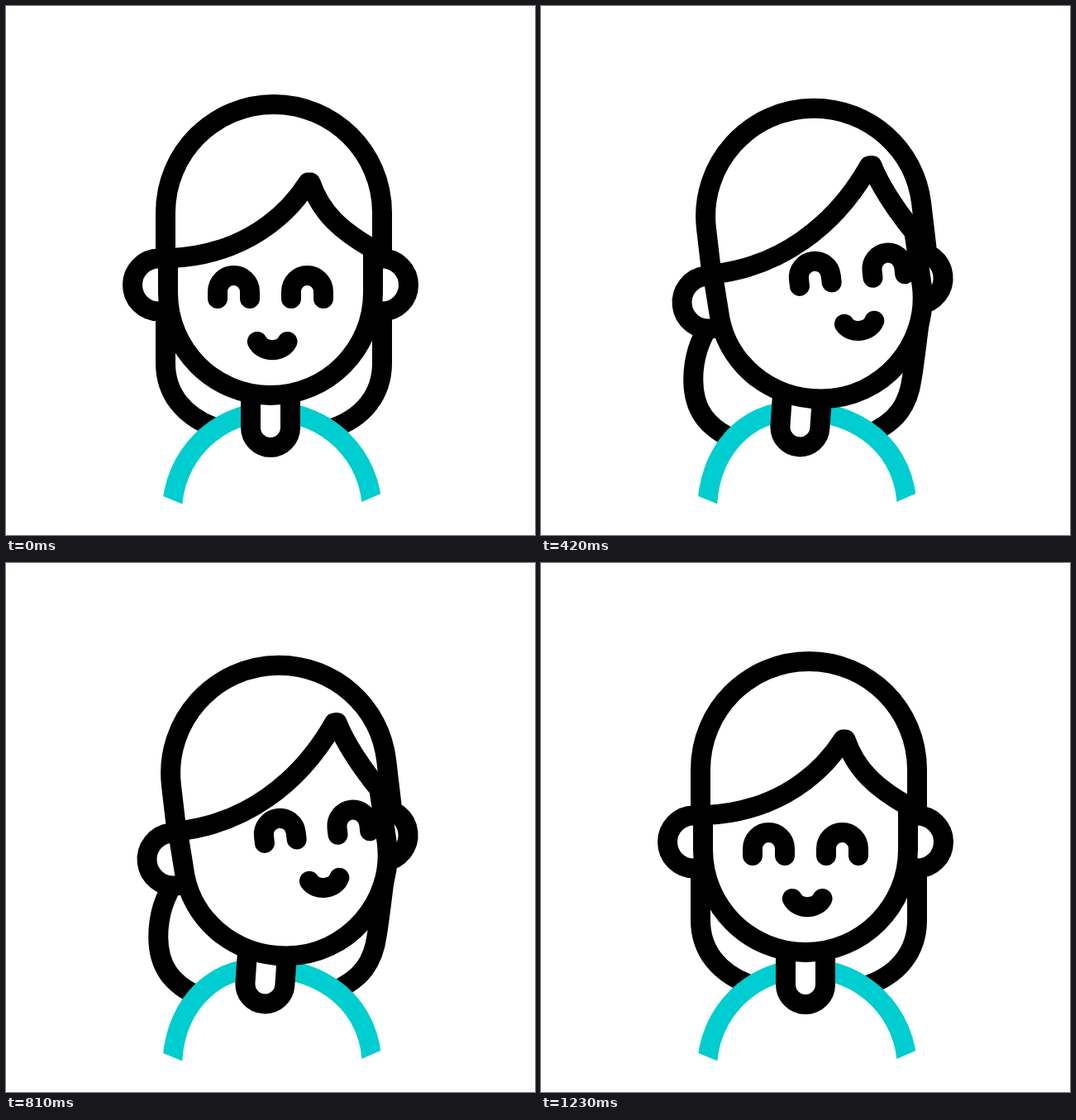
Write an HTML page that moves like this. It is 640 px wide and 640 px high and loops after 1260 ms.

```html
<!DOCTYPE html>
<html lang="en">
<head>
<meta charset="utf-8">
<title>Smiling girl turning her head</title>
<style>
  html, body { margin: 0; width: 100%; height: 100%; overflow: hidden; background: #fff; }
  svg { display: block; width: 100vw; height: 100vh; }
  path { fill: none; stroke: #000; stroke-width: 24; stroke-linecap: round; stroke-linejoin: round; }
  .solid { fill: #fff; }
  .shirt { fill: #fff; stroke: #00cdcf; stroke-linecap: butt; }
</style>
</head>
<body>
<svg id="stage" viewBox="0 0 640 640">
  <clipPath id="hem"><polygon points="0,0 640,0 640,509 322,647 0,515"/></clipPath>
</svg>
<script>
const STEP = 30, STEPS = 42, HALF = 20, TILT = -7.5;
const stage = document.getElementById('stage');
const updates = [];
const lerp = (a, b, p) => a + (b - a) * p;

function addPath(cls) {
  const el = document.createElementNS('http://www.w3.org/2000/svg', 'path');
  if (cls) el.setAttribute('class', cls);
  stage.appendChild(el);
  return el;
}

// A line whose points slide from one pose to the other.
function morph(from, to, cls) {
  const el = addPath(cls);
  const goal = to.match(/-?[\d.]+/g).map(Number);
  updates.push(p => {
    let i = 0;
    el.setAttribute('d', from.replace(/-?[\d.]+/g, n => lerp(+n, goal[i++], p).toFixed(2)));
  });
  return el;
}

// A rigid piece that moves and tilts.
function rigid(d, [x0, y0], [x1, y1], tilt = TILT, cls = '', flip = 1) {
  const el = addPath(cls);
  el.setAttribute('d', d);
  updates.push(p => el.setAttribute('transform',
    `translate(${lerp(x0, x1, p)} ${lerp(y0, y1, p)}) rotate(${tilt * p}) scale(${flip} 1)`));
}

// Hair behind the shoulders
morph('M193,365 C193,388 193,410 193,432 C193,467 213,497 258,512',
      'M208,385 C193,403 183,428 183,455 C183,488 196,514 240,530');
morph('M455,365 C455,388 455,410 455,432 C455,468 434,500 388,513',
      'M462,360 C457,385 453,425 448,452 C443,485 430,504 395,520');

// Top of the hair
morph('M193,300 L193,250 C193,177.6 251.6,119 324,119 C396.4,119 455,177.6 455,250 L455,300',
      'M208,325 L201,272 C190.7,194 252,124.5 331,124.5 C397,124.5 452.4,172.6 461,238 L468,290');

// Shirt and neck
morph('M201,612 C201,545 255,491 322,491 C389,491 443,545 443,612',
      'M201,612 C201,540 245,489 308,490 C383,489 443,533 443,612', 'shirt')
  .setAttribute('clip-path', 'url(#hem)');
rigid('M-24,-34 V0 A24,24 0 0 0 24,0 V-34', [320, 510], [312.5, 509.3], 4.5, 'solid');

// Ears
const ear = 'M5,-32 H0 A32,32 0 0 0 0,32 H5';
rigid(ear, [185, 337.5], [205, 361.5], TILT, 'solid');
rigid(ear, [455, 337.5], [454.5, 328], TILT, 'solid', -1);

// Face and fringe
morph('M196,305 L196,347 C196,415.5 251.5,471 320,471 C388.5,471 444,415.5 444,347 L444,296',
      'M208,318 L217.5,371 C226,433 279,476 342,476 C416,476 474,409 463,336 L453,275', 'solid');
morph('M200,305 C270,302 330,269 365.5,213.5 L368.5,213.5 C381,250 405,272 444,294',
      'M209,327 C290,318 358,268 401.5,190.5 L405,190 C413,210 432,243 456,275');

// Eyes and mouth
const eye = 'M-19.5,8.5 V0 A19.5,19.5 0 0 1 19.5,0 V8.5';
rigid(eye, [275.5, 345.5], [339.2, 325.8]);
rigid(eye, [364.5, 345.5], [427.7, 314.2]);
rigid('M-18.3,0 C-11.5,13.5 11.5,13.5 18.3,0', [322.2, 406], [394, 379.5]);

// cubic-bezier(.214, 0, .5, 1)
function ease(x) {
  let lo = 0, hi = 1;
  for (let i = 0; i < 24; i++) {
    const t = (lo + hi) / 2, u = 1 - t;
    if (3 * u * u * t * 0.214 + 3 * u * t * t * 0.5 + t * t * t < x) lo = t; else hi = t;
  }
  return lo * lo * (3 - 2 * lo);
}

function draw(time) {
  const n = Math.floor(Math.max(0, time) / STEP) % STEPS;
  const p = ease(Math.min(n, STEPS - 1 - n) / HALF);
  updates.forEach(update => update(p));
}

function loop(time) {
  draw(time);
  requestAnimationFrame(loop);
}
draw(0);
requestAnimationFrame(loop);
</script>
</body>
</html>
```
